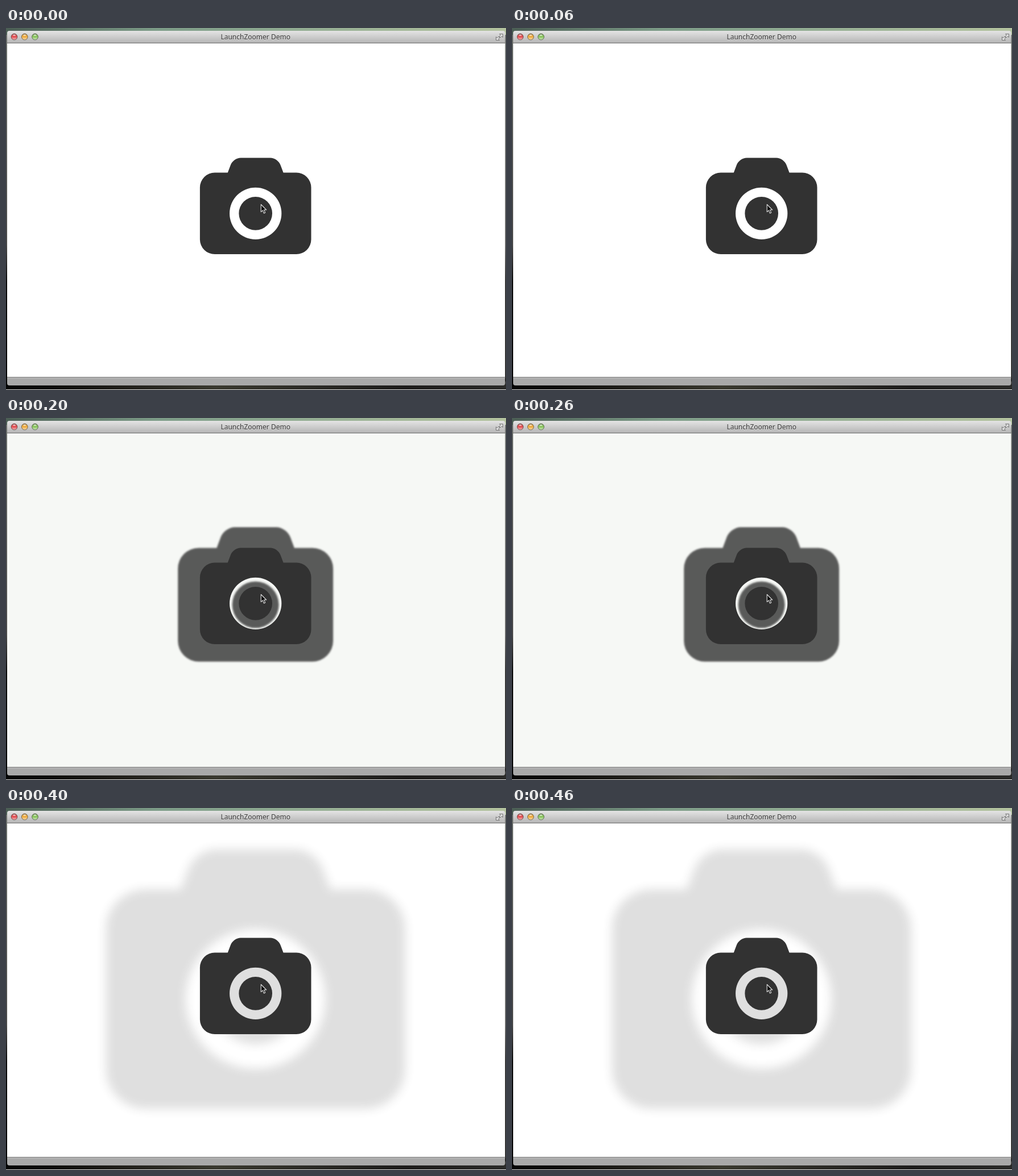
An HTML page that plays this animation: 879x637 px, repeating every 500 ms.

```html
<!DOCTYPE html>
<html lang="en">
<head>
<meta charset="utf-8">
<title>LaunchZoomer Demo</title>
<style>
  html, body { margin: 0; width: 100%; height: 100%; overflow: hidden; }
  svg { display: block; }
  text { font: 12px "Noto Sans", "Open Sans", sans-serif; text-anchor: middle; }
</style>
</head>
<body>
<svg width="879" height="637" viewBox="0 0 879 637">
  <defs>
    <linearGradient id="sky">
      <stop offset="0" stop-color="#4c5f55"/>
      <stop offset=".3" stop-color="#7d9c88"/>
      <stop offset=".55" stop-color="#90ab92"/>
      <stop offset="1" stop-color="#b4c39f"/>
    </linearGradient>
    <linearGradient id="ground">
      <stop offset="0" stop-color="#030303"/>
      <stop offset=".2" stop-color="#1c1b17"/>
      <stop offset=".42" stop-color="#3a392f"/>
      <stop offset=".6" stop-color="#2c2b26"/>
      <stop offset=".8" stop-color="#1d1c1b"/>
      <stop offset="1" stop-color="#2b2b29"/>
    </linearGradient>
    <linearGradient id="side" x2="0" y2="1">
      <stop offset="0" stop-color="#6b6f6c"/>
      <stop offset=".6" stop-color="#4a4a4a"/>
      <stop offset=".7" stop-color="#0a0a0a"/>
      <stop offset="1" stop-color="#050505"/>
    </linearGradient>
    <linearGradient id="bar" x2="0" y2="1">
      <stop offset="0" stop-color="#e4e4e4"/>
      <stop offset="1" stop-color="#b3b3b3"/>
    </linearGradient>
    <linearGradient id="gloss" x2="0" y2="1">
      <stop offset="0" stop-color="#000" stop-opacity=".4"/>
      <stop offset=".45" stop-color="#fff" stop-opacity="0"/>
      <stop offset="1" stop-color="#fff" stop-opacity=".6"/>
    </linearGradient>
    <path id="camera" fill="#323232" fill-rule="evenodd" transform="translate(340.9 228.5) scale(6.52)"
      d="M4 4h3.5l.797-2.125C8.687.845 9.907 0 11 0h8c1.094 0 2.31.845 2.703 1.875L22.5 4H26a4 4 0 0 1 4 4v14a4 4 0 0 1-4 4H4a4 4 0 0 1-4-4V8a4 4 0 0 1 4-4z
         M15 8a7 7 0 0 0 0 14a7 7 0 0 0 0-14z
         M15 10.5a4.5 4.5 0 0 1 0 9a4.5 4.5 0 0 1 0-9z"/>
    <g id="light">
      <circle r="5.4"/>
      <circle r="5.4" fill="url(#gloss)" stroke="#000" stroke-opacity=".45"/>
      <ellipse cy="-3" rx="2.4" ry="1.3" fill="#fff" opacity=".65"/>
    </g>
  </defs>

  <rect width="879" height="637" fill="url(#side)"/>
  <rect width="879" height="12" fill="url(#sky)"/>
  <rect y="622" width="879" height="14" fill="url(#ground)"/>
  <rect y="636" width="879" height="1" fill="#e8e8e8"/>

  <path fill="url(#bar)" d="M2 27V9a4 4 0 0 1 4-4H873.500a4 4 0 0 1 4 4V27z"/>
  <path fill="#a9a9a9" d="M2 614H877.500V625a4 4 0 0 1-4 4H6a4 4 0 0 1-4-4z"/>
  <rect id="page" x="2" y="27" width="875.5" height="587" fill="#fff"/>
  <path stroke="#6c6c6c" d="M2 26.500H877.500M2 614.500H877.500"/>
  <path stroke="#c6c6c6" d="M2 615.500H877.500"/>

  <use href="#light" x="14.5" y="15.500" fill="#e0484b"/>
  <use href="#light" x="32.800" y="15.500" fill="#eda838"/>
  <use href="#light" x="51" y="15.500" fill="#84c257"/>
  <text x="438.700" y="21" fill="#fff" opacity=".5">LaunchZoomer Demo</text>
  <text x="438.700" y="20" fill="#3a3a3a">LaunchZoomer Demo</text>
  <g fill="#ddd" stroke="#747474">
    <path d="M867.500 10.500h6v6l-2-2-2.500 2.500-2-2 2.500-2.500z"/>
    <path d="M867.500 21.500h-6v-6l2 2 2.500-2.500 2 2-2.500 2.500z"/>
  </g>

  <g id="ghost"><g id="zoom"><use href="#camera"/></g></g>
  <use href="#camera"/>
  <path fill="#0c0c0c" stroke="#e2e2e2" stroke-width="1.100" stroke-linejoin="round"
    d="M448.300 310.500V323.600L451.300 320.800L453.400 326L455.700 325L453.600 320H457.700z"/>
</svg>
<script>
const STEP = 100;
const CX = 438.75, CY = 320.5;

// page colour, zoom, blur
const steps = [
  ["#ffffff", 1, 0],
  ["#faf9f5", 1, 0],
  ["#f6f8f5", 1.395, 1.4],
  ["#ffffff", 2.115, 3.8],
  ["#ffffff", 2.69, 8.5],
];

function play(id, pose) {
  const frames = steps.map((s, i) => ({ ...pose(s), offset: i / steps.length, easing: "steps(1, end)" }));
  frames.push({ ...pose(steps[steps.length - 1]), offset: 1 });
  document.getElementById(id).animate(frames, { duration: steps.length * STEP, iterations: Infinity });
}

play("page", ([fill]) => ({ fill }));
play("zoom", ([, k]) => ({
  transform: `translate(${CX * (1 - k)}px, ${CY * (1 - k)}px) scale(${k})`,
}));
// the ghost fades out evenly as it grows to three times its size
play("ghost", ([, k, blur]) => ({
  opacity: k > 1 ? (3 - k) / 2 : 0,
  filter: `blur(${blur}px)`,
}));
</script>
</body>
</html>
```
